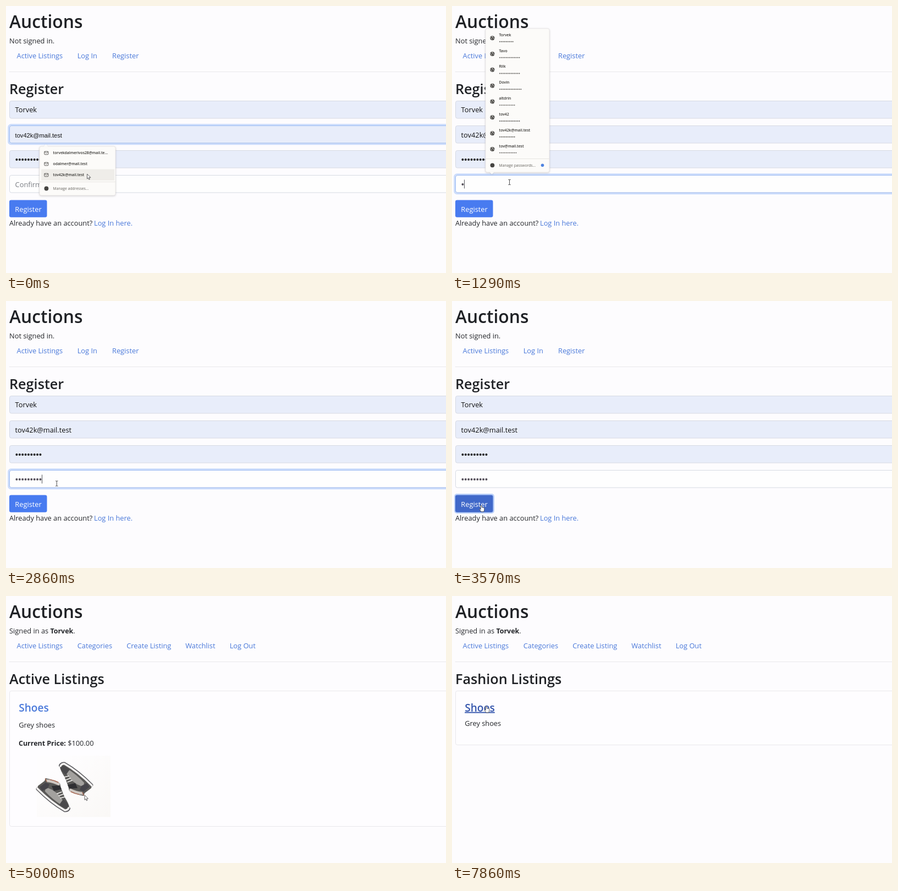
Write an HTML page that moves like this. It is 800 px wide and 485 px high and loops after 8 s.

```html
<!DOCTYPE html>
<html lang="en">
<head>
<meta charset="utf-8">
<title>Auctions</title>
<style>
html, body { margin: 0; width: 100%; height: 100%; overflow: hidden; background: #fdfcfe; }
svg { display: block; width: 100%; height: 100%; }
text { font: 12.8px "Open Sans", "Noto Sans", sans-serif; fill: #24262a; white-space: pre; }
.h1 { font-size: 31.8px; font-weight: 600; fill: #1f2125; }
.h2 { font-size: 25.2px; font-weight: 600; fill: #1f2125; }
.h4 { font-size: 19.1px; font-weight: 600; }
.b { font-weight: 700; font-size: 12.45px; }
.link { fill: #4a79da; }
.link.hover { fill: #3556ad; }
.line.hover { text-decoration: underline; }
.typed { fill: #111; }
.hint { fill: #7a7d83; }
.preview { font: 11.1px "Liberation Sans", Arial, sans-serif; fill: #111; }
.item { font-size: 6.8px; font-weight: 600; fill: #33322f; }
.manage { font-size: 6.8px; fill: #66645f; }
</style>
</head>
<body>
<svg id="stage" viewBox="0 0 800 485" xmlns="http://www.w3.org/2000/svg"></svg>
<script>
const USER = 'Torvek', MAIL = 'tov42k@mail.test';
const TICK = 1000 / 7, LOOP = 8000;
const EDGE = '#e9e8eb';

const text = (x, y, s, cls = '', id = '') =>
  `<text x="${x}" y="${y}" class="${cls}"${id && ` id="${id}"`}>${s}</text>`;
const box = (x, y, w, h, fill, stroke = 'none', r = 3.3, more = '') =>
  `<rect x="${x}" y="${y}" width="${w}" height="${h}" rx="${r}" fill="${fill}" stroke="${stroke}" ${more}/>`;
const path = (d, fill = 'none', stroke = 'none', w = 1) =>
  `<path d="${d}" fill="${fill}" stroke="${stroke}" stroke-width="${w}" stroke-linejoin="round" stroke-linecap="round"/>`;
const group = (id, body) => `<g id="${id}">${body}</g>`;
const rule = (x1, x2, y, color) => path(`M${x1} ${y}H${x2}`, 'none', color);
const disc = (x, y, r, color) => `<circle cx="${x}" cy="${y}" r="${r}" fill="${color}"/>`;
const dots = (n, x, y, step, r, color) =>
  Array.from({ length: n }, (_, i) => disc(x + i * step, y, r, color)).join('');
const bullets = (n, y, color) => dots(n, 19.4, y, 5.38, 2, color);

const nav = items => items.map(([x, s, id]) => text(x, 95, s, 'link', id)).join('');

// Form parts
const field = (y, fill = '#e8edfa') => box(6.5, y, 810, 31.5, fill, '#d6dae3');
const ring = y => box(4.6, y - 1.9, 814, 35.3, 'none', '#cbdcfb', 4.5, 'stroke-width="2.8"') +
  box(6.5, y, 810, 31.5, 'none', '#9dbcf3');

const panel = (w, y, h, arrow) =>
  `<g filter="url(#soft)">${box(61, y, w, h, '#fcfbf9', '#dddbd8', 3, 'stroke-width=".6"')}${path(arrow, '#fcfbf9')}</g>`;
const mailIcon = y => box(69.8, y - 2.8, 7, 5.6, 'none', '#4b4a47', 0.8, 'stroke-width=".9"') +
  path(`M70 ${y - 2.2}L73.3 ${y + 0.3}L76.6 ${y - 2.2}`, 'none', '#4b4a47', 0.8);
const globe = y => disc(73.4, y, 4, '#4a4946') +
  path(`M70.3 ${y - 0.8}l2 1.9v1.7M72.2 ${y - 2.7}h2.2l-.8 1.8 2.2 1 .5 1.5`, 'none', '#d6d4d0', 0.9);

const mailPopup = () => {
  const mails = ['torvekdalmerivos28@mail.te...', 'odalmer@mail.test', MAIL];
  return panel(138, 255, 89, 'M68.5 255.5l4-4 4 4z') +
    box(64, 296.5, 133, 20.5, '#efede9', 'none', 1) +
    mails.map((m, i) => mailIcon(267 + i * 20) + text(85.5, 269.2 + i * 20, m, 'item')).join('') +
    rule(61, 199, 319.5, '#e8e6e3') + disc(73.4, 331.5, 3.9, '#464542') +
    text(85.5, 334, 'Manage addresses...', 'manage');
};

const passPopup = () => {
  const logins = [[USER, 9], ['Tavo', 13], ['Rilk', 13], ['Dovin', 14], ['altdrin', 10],
    ['tov42', 13], [MAIL, 10], ['tov@mail.test', 11]];
  return panel(116, 41, 261, 'M68.5 301.5l4 4 4-4z') +
    logins.map(([name, n], i) => {
      const y = 58.2 + i * 28.83;
      return globe(y) + text(85.5, y - 3.4, name, 'item') + dots(n, 87, y + 6.6, 2.95, 0.95, '#4c4a47');
    }).join('') +
    rule(61, 177, 277.5, '#e8e6e3') + disc(73.4, 289.3, 3.9, '#464542') +
    text(85.5, 292, 'Manage passwords...', 'manage') + disc(164.5, 289.3, 2.8, '#4f83e0');
};

const form = () =>
  text(6, 68.3, 'Not signed in.') + nav([[19.6, 'Active Listings'], [129.7, 'Log In'], [193, 'Register']]) +
  text(6, 160, 'Register', 'h2') +
  field(172.5) + text(16.6, 193.4, USER, 'typed') +
  field(217.5) + text(16.6, 238.6, MAIL, 'preview', 'mailPreview') + text(16.6, 238.6, MAIL, 'typed', 'mailTyped') +
  field(262.5) + bullets(9, 279, '#111') +
  field(307.5, '#fefefe') + text(16.6, 328.5, 'Confirm Password', 'hint', 'hint') +
  group('mailRing', ring(217.5)) + group('passRing', ring(307.5)) +
  group('typedDots', '') + `<rect id="caret" y="315.5" width="1" height="16" fill="#55565c"/>` +
  group('buttonRing', box(4, 350, 73, 36, '#b9cff9', 'none', 5)) +
  `<rect id="button" x="6" y="352.5" width="68.5" height="31.3" rx="3.3"/>` +
  `<text x="16.3" y="373.8" style="fill:#fff">Register</text>` +
  text(6, 399.3, 'Already have an account?') + text(160, 399.3, 'Log In here.', 'link') +
  group('mailPopup', mailPopup()) + group('passPopup', passPopup());

// Listing pages
const member = () =>
  `<text x="6" y="68.3">Signed in as <tspan class="b">${USER}</tspan>.</text>` +
  nav([[19.6, 'Active Listings'], [129.7, 'Categories', 'navCat'], [219.3, 'Create Listing'],
    [326.2, 'Watchlist'], [406.7, 'Log Out']]);
const card = h => box(6.5, 172.5, 810, h, '#fefdff', EDGE);

const shoe =
  path('M58 345L70 336L72 331Q84 333 98 340Q100 351 107 366Q114 377 115 383L108 390Q82 375 57 350Z', '#5a5957') +
  path('M73 333Q87 333 98 340L97 345Q86 339 74 338Z', '#cfc8c2') +
  path('M71.5 332L74 337M80 333.5Q88 335 95 338.5', 'none', '#a86a55', 1.5) +
  path('M72 347L84 352L95 360L106 375L101 380Q84 369 71 355Z', '#a3a19e') +
  path('M61 347L72 339L79 342L76 349L66 354Z', '#45444a') +
  path('M83 345L97 344L101 351L87 354Z', '#2f2f32') +
  path('M104 369Q113 376 114 382L109 386Q103 384 97 379Z', '#4a494b') +
  path('M93 359l8-3M96 363l8-3M99 367l8-2', 'none', '#f4f2ef', 1.6) +
  path('M57 350.5Q82 376 107 390Q113 390 114.5 386', 'none', '#56555a', 5) +
  path('M57 349.8Q82 375 107 389.2Q112 389.2 114 385', 'none', '#f6f4f2', 3.4);
const photo = () => box(56, 290, 134, 111.5, 'url(#wall)', 'none', 0) +
  shoe + `<g transform="rotate(180 106.5 347)">${shoe}</g>`;

const listings = () => text(6, 160, 'Active Listings', 'h2') + card(246) +
  text(23.2, 209.7, 'Shoes', 'h4 link') + text(23.2, 239, 'Grey shoes') +
  `<text x="23" y="272.4"><tspan class="b">Current Price:</tspan> $100.00</text>` + photo();
const categories = () => text(6, 160, 'Categories', 'h2') + card(162.7) +
  ['Fashion', 'Toys', 'Electronics', 'Home'].map((s, i) =>
    (i ? rule(6.5, 800, 172.5 + i * 40.67, EDGE) : '') +
    text(23.2, 198.5 + i * 40.67, s, 'link line', i ? '' : 'fashion')).join('');
const fashionPage = () => text(6, 160, 'Fashion Listings', 'h2') + card(98) +
  text(23.2, 209.7, 'Shoes', 'h4 link line', 'shoes') + text(23.2, 235.5, 'Grey shoes');

// Pointers, each with its hot spot at 0,0
const pointers =
  group('arrow', path('M0 0V8.4L2 6.6L3.4 9.8L4.8 9.2L3.5 6.1H6Z', '#fff', '#3a3a3c', 0.8)) +
  group('beam', path('M-1.8 -4.6H-.5L0 -4L.5 -4.6H1.8M0 -4V4M-1.8 4.6H-.5L0 4L.5 4.6H1.8', 'none', '#3a3a3c', 0.9)) +
  group('hand', path('M-1 .8Q0 -.6 1 .8V4Q2 3.2 2.8 4.2Q3.7 3.6 4.4 4.6Q5.8 4.2 5.8 5.6V8Q5.6 10 4.6 11.8H-.2Q-1 10 -3 7.6Q-3.4 6 -1 7.2Z', '#fff', '#3a3a3c', 0.8));

const pages = { form, listings, categories, fashionPage };

document.getElementById('stage').innerHTML = `<defs>
  <filter id="soft" x="-10%" y="-10%" width="120%" height="120%">
    <feDropShadow dx="0" dy="1" stdDeviation="1.4" flood-color="#555" flood-opacity=".28"/></filter>
  <linearGradient id="wall" x2="1" y2="1"><stop offset=".2" stop-color="#fefdfe"/>
    <stop offset="1" stop-color="#faf8f6"/></linearGradient></defs>` +
  text(6, 40.3, 'Auctions', 'h1') + rule(6, 800, 119.5, EDGE) + group('member', member()) +
  Object.entries(pages).map(([id, body]) => group(id, body())).join('') + group('pointer', pointers);

const el = id => document.getElementById(id);
const show = (id, on) => { el(id).style.display = on ? '' : 'none'; };
const hover = (id, on) => el(id).classList.toggle('hover', on);

// tick, x, y, pointer shape from here on
const route = [
  [0, 147.5, 305.5, 'arrow'], [2, 147.5, 305.5, 'arrow'], [3, 134, 311, 'beam'], [5, 104.5, 320, 'beam'],
  [19, 104.5, 320, 'beam'], [21, 80, 343, 'arrow'], [23, 53, 371, 'hand'], [27, 53, 371, 'arrow'],
  [29, 53, 371, 'arrow'], [32, 143, 362, 'arrow'], [35, 143, 362, 'arrow'], [40, 160, 88, 'hand'],
  [42, 160, 88, 'hand'], [43, 138, 126, 'arrow'], [44, 100.5, 178.5, 'arrow'], [46, 45, 191, 'hand'],
  [48, 45, 191, 'arrow'], [50, 45, 191, 'arrow'], [51, 48, 193, 'hand'], [55, 62, 200, 'hand'], [56, 62, 200, 'hand']
];

function movePointer(k) {
  const i = route.findIndex((p, n) => route[n + 1][0] > k);
  const [t0, x0, y0, shape] = route[i], [t1, x1, y1] = route[i + 1];
  const p = (k - t0) / (t1 - t0), e = p * p * (3 - 2 * p);
  el('pointer').setAttribute('transform', `translate(${x0 + (x1 - x0) * e} ${y0 + (y1 - y0) * e})`);
  for (const s of ['arrow', 'beam', 'hand']) show(s, s === shape);
}

function draw(k) {
  const page = k < 27 ? 'form' : k < 42 ? 'listings' : k < 48 ? 'categories' : 'fashionPage';
  for (const p in pages) show(p, p === page);
  show('member', page !== 'form');

  const typed = k < 9 ? 0 : Math.min(9, k - 8 - (k > 13));
  const focused = k >= 5 && k < 24;
  show('mailPreview', k < 1);
  show('mailTyped', k >= 1);
  show('mailPopup', k < 1);
  show('mailRing', k < 5);
  show('passRing', focused);
  show('passPopup', k >= 6 && k < 19);
  show('hint', !typed);
  el('typedDots').innerHTML = bullets(typed, 324, '#55505a');
  show('caret', focused);
  el('caret').setAttribute('x', 16.6 + typed * 5.38);
  show('buttonRing', k >= 24);
  el('button').setAttribute('fill', k < 23 ? '#487bf0' : '#4068c9');

  hover('navCat', k >= 40 && k < 43);
  hover('fashion', k >= 46);
  hover('shoes', k >= 51);
  movePointer(k);
}

const start = performance.now();
let last = -1;
function loop() {
  const t = (performance.now() - start) % LOOP;
  const k = Math.min(55, Math.floor((t + 4) / TICK));
  if (k !== last) draw(last = k);
  requestAnimationFrame(loop);
}
loop();
</script>
</body>
</html>
```
